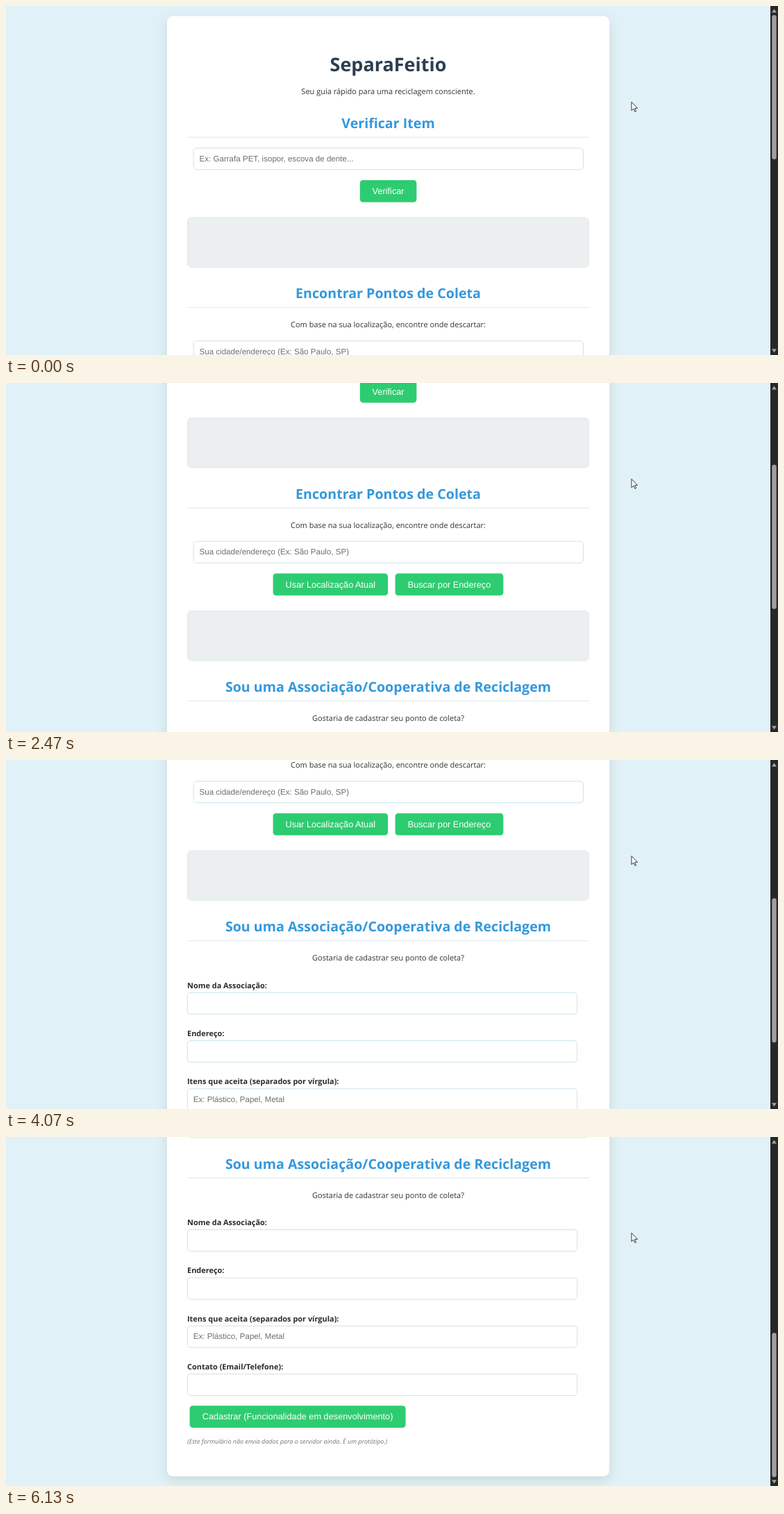
Write an HTML page that moves like this. It is 1112 px wide and 503 px high and loops after 7.2 s.

```html
<!DOCTYPE html>
<html lang="pt-BR">
<head>
<meta charset="utf-8">
<title>SeparaFeitio</title>
<style>
  html, body { margin: 0; width: 100%; height: 100%; overflow: hidden; background: #e0f2f7; }
  svg { display: block; }
  text { text-rendering: geometricPrecision; }
  .ui { font-family: "Open Sans", "Noto Sans", sans-serif; fill: #333; }
  .head { font-weight: 700; fill: #3498db; }
  .title { font-weight: 700; fill: #2c3e50; }
  .label { font-weight: 700; fill: #2b2b2b; }
  .note { font-style: italic; fill: #777; }
  .form { font-family: "Liberation Sans", Arial, sans-serif; fill: #6e6e6e; }
  .form.on { fill: #fff; }
  .card { fill: #fff; filter: drop-shadow(0 5.8px 9px rgba(0, 0, 0, .1)); }
</style>
</head>
<body>
<svg id="stage" width="1112" height="503" viewBox="0 0 1112 503">
  <rect width="1112" height="503" fill="#e0f2f7"/>
  <g id="page"></g>
  <rect x="1101" width="11" height="503" fill="#272727"/>
  <g fill="#a0a0a0">
    <path d="M1106.5 4.2l3.6 5.2h-7.2z"/>
    <path d="M1106.5 499.4l3.6-5.2h-7.2z"/>
    <rect id="thumb" x="1103.3" y="13" width="6.4" height="208" rx="3.2"/>
  </g>
  <path d="M901 138.3v12.4l2.9-2.7 2 4.4 1.8-.8-2-4.3h3.9z" fill="#fff" stroke="#222" stroke-width=".9" stroke-linejoin="round"/>
</svg>
<script>
const NS = "http://www.w3.org/2000/svg";
const page = document.getElementById("page");
const thumb = document.getElementById("thumb");
const LEFT = 261, WIDTH = 579, CENTER = 550.5;

function add(tag, attrs, content) {
  const el = document.createElementNS(NS, tag);
  for (const key in attrs) el.setAttribute(key, attrs[key]);
  if (content) el.textContent = content;
  page.appendChild(el);
}

function write(content, x, y, size, cls, anchor = "middle") {
  add("text", { x, y, "font-size": size, class: cls, "text-anchor": anchor }, content);
}

function heading(content, y) {
  write(content, CENTER, y, 19.65, "ui head");
  add("rect", { x: LEFT, y: y + 12.6, width: WIDTH, height: 1.45, fill: "#e9eef0" });
}

function field(x, y, hint) {
  add("rect", { x: x + .4, y: y + .4, width: 561.4, height: 31, rx: 4.2, fill: "#fff", stroke: "#c8dfeb", "stroke-width": .9 });
  if (hint) write(hint, x + 8.8, y + 19.5, 11.58, "form", "start");
}

function button(content, x, y, width) {
  add("rect", { x, y, width, height: 31.9, rx: 4.4, fill: "#2ecc71" });
  write(content, x + width / 2, y + 20.2, 12.74, "form on");
}

function resultBox(y) {
  add("rect", { x: LEFT + .4, y: y + .4, width: WIDTH - .8, height: 71.5, rx: 5.5, fill: "#ebeff0", stroke: "#e1e6e7", "stroke-width": .9 });
}

add("rect", { x: 232, y: 14.5, width: 637, height: 1128.2, rx: 8.5, class: "card" });
write("SeparaFeitio", CENTER, 94, 27, "ui title");
write("Seu guia rápido para uma reciclagem consciente.", CENTER, 127.4, 11, "ui");

heading("Verificar Item", 175.8);
field(269.7, 204.4, "Ex: Garrafa PET, isopor, escova de dente...");
button("Verificar", 509.8, 250.9, 81.6);
resultBox(304.5);

heading("Encontrar Pontos de Coleta", 421.2);
write("Com base na sua localização, encontre onde descartar:", CENTER, 463.2, 11, "ui");
field(269.7, 482.3, "Sua cidade/endereço (Ex: São Paulo, SP)");
button("Usar Localização Atual", 384.6, 528.8, 165.5);
button("Buscar por Endereço", 560.6, 528.8, 155.8);
resultBox(582.6);

heading("Sou uma Associação/Cooperativa de Reciclagem", 699.3);
write("Gostaria de cadastrar seu ponto de coleta?", CENTER, 741.3, 11, "ui");
[
  ["Nome da Associação:"],
  ["Endereço:"],
  ["Itens que aceita (separados por vírgula):", "Ex: Plástico, Papel, Metal"],
  ["Contato (Email/Telefone):"]
].forEach(([label, hint], i) => {
  const y = 787 + i * 69.3;
  write(label, LEFT, y - 6.2, 10.95, "ui label", "start");
  field(LEFT, y, hint);
});
button("Cadastrar (Funcionalidade em desenvolvimento)", 264.6, 1040.9, 311);
write("(Este formulário não envia dados para o servidor ainda. É um protótipo.)", LEFT, 1095.4, 9, "ui note", "start");

// Each wheel notch scrolls a fixed distance with its own ease in and out.
const LOOP = 7200, FPS = 15, NOTCH = 72.35, NOTCH_MS = 200, MAX_SCROLL = 653.7;
const notchStarts = [765, 1400, 1898, 2365, 2948, 3500, 3996, 4533, 5066, 5533];

function ease(x) {
  x = Math.min(1, Math.max(0, x));
  return x < .5 ? 2 * x * x : 1 - 2 * (1 - x) ** 2;
}

function scrollAt(ms) {
  return notchStarts.reduce((from, start, i) => {
    const to = Math.min(MAX_SCROLL, (i + 1) * NOTCH);
    return from + (to - i * NOTCH) * ease((ms - start) / NOTCH_MS);
  }, 0);
}

function render(ms) {
  const step = Math.floor((ms % LOOP + 4) * FPS / 1000) % (LOOP * FPS / 1000);
  const scroll = scrollAt(step * 1000 / FPS);
  page.setAttribute("transform", `translate(0 ${-scroll.toFixed(2)})`);
  thumb.setAttribute("y", 13 + 269.3 * scroll / MAX_SCROLL);
}

const began = performance.now();
function tick() {
  render(performance.now() - began);
  requestAnimationFrame(tick);
}
tick();
</script>
</body>
</html>
```
